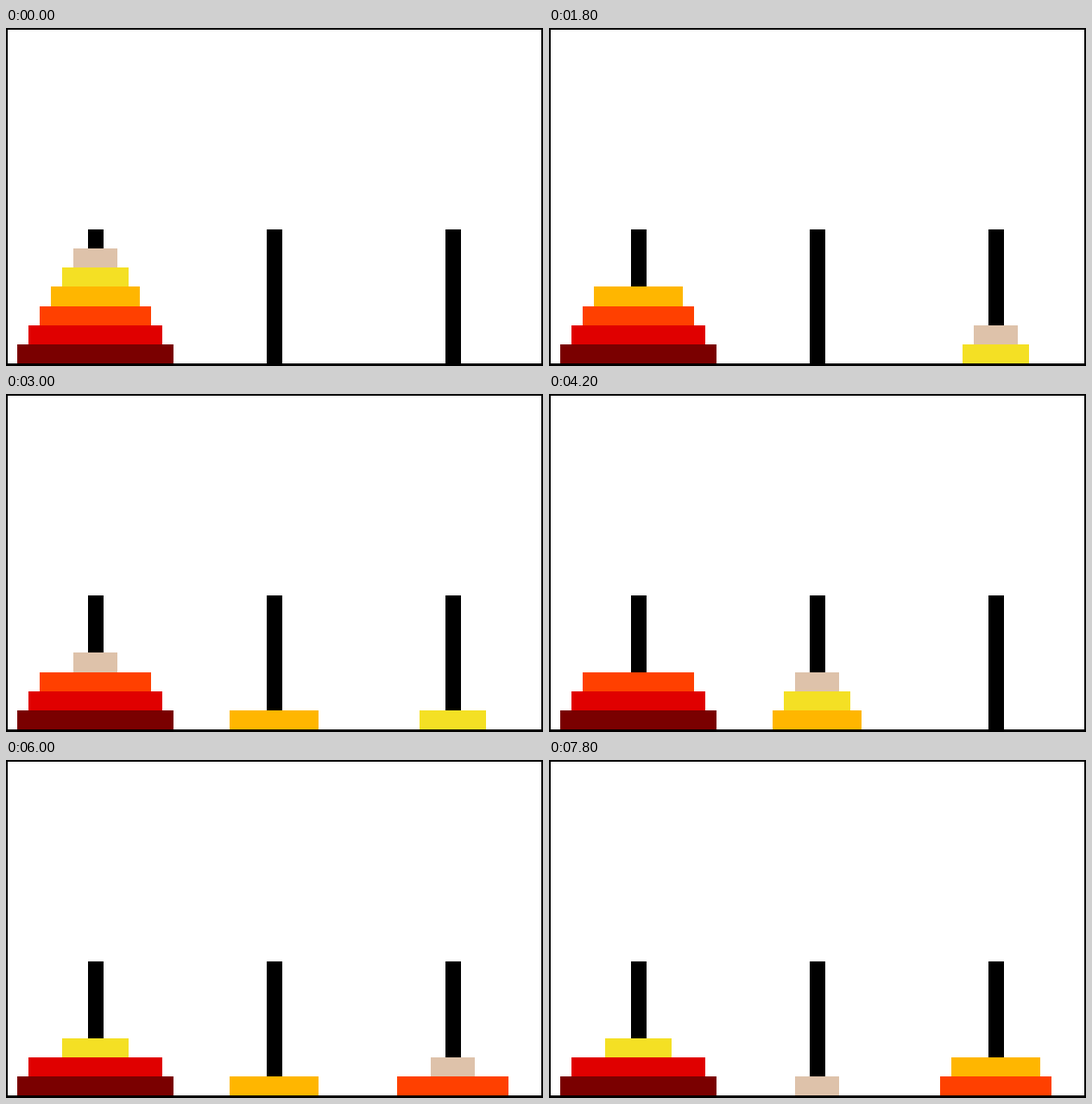
These frames come from a looping animation (622 by 391 pixels, 8 s). An HTML page:

```html
<!DOCTYPE html>
<html lang="en">
<head>
<meta charset="utf-8">
<title>Tower of Hanoi</title>
<style>
  html, body { margin: 0; width: 100%; height: 100%; overflow: hidden; background: #fff; }
  svg { display: block; }
</style>
</head>
<body>
<svg id="stage" width="622" height="391" viewBox="0 0 622 391" shape-rendering="crispEdges"></svg>
<script>
const LOOP = 8000, STEP = 600;
const FLOOR = 388, ROW = 155 / 7, GAP = 207;
const COLORS = ['#dec2aa', '#f4e024', '#ffb600', '#ff4000', '#e00000', '#7a0000'];
const stage = document.getElementById('stage');

function rect(x, y, width, height, fill) {
  const el = document.createElementNS('http://www.w3.org/2000/svg', 'rect');
  for (const [k, v] of Object.entries({ x, y, width, height, fill })) el.setAttribute(k, v);
  return stage.appendChild(el);
}

rect(0, 0, 622, 391, '#000');
rect(2, 2, 618, 386, '#fff');
for (let p = 0; p < 3; p++) rect(95 + p * GAP, 233, 18, 155, '#000');
const disks = COLORS.map((c, i) => rect(78 - 13 * i, 0, 51 + 26 * i, 22, c));

// Disk i makes every 2^(i+1)-th move; neighbouring sizes circle in opposite directions.
function pegOf(i, moves) {
  const count = Math.floor((moves + 2 ** i) / 2 ** (i + 1));
  return count * (i % 2 ? 2 : 1) % 3;
}

function rowTop(level) {
  return Math.round(FLOOR - level * ROW);
}

function draw(time) {
  const moves = Math.floor(time / STEP);
  const heights = [0, 0, 0];
  for (let i = disks.length - 1; i >= 0; i--) {
    const peg = pegOf(i, moves);
    const bottom = rowTop(heights[peg]);
    const top = rowTop(++heights[peg]);
    disks[i].setAttribute('x', 78 - 13 * i + peg * GAP);
    disks[i].setAttribute('y', top);
    disks[i].setAttribute('height', bottom - top);
  }
}

const start = performance.now();
function tick() {
  draw((performance.now() - start) % LOOP);
  requestAnimationFrame(tick);
}
tick();
</script>
</body>
</html>
```
